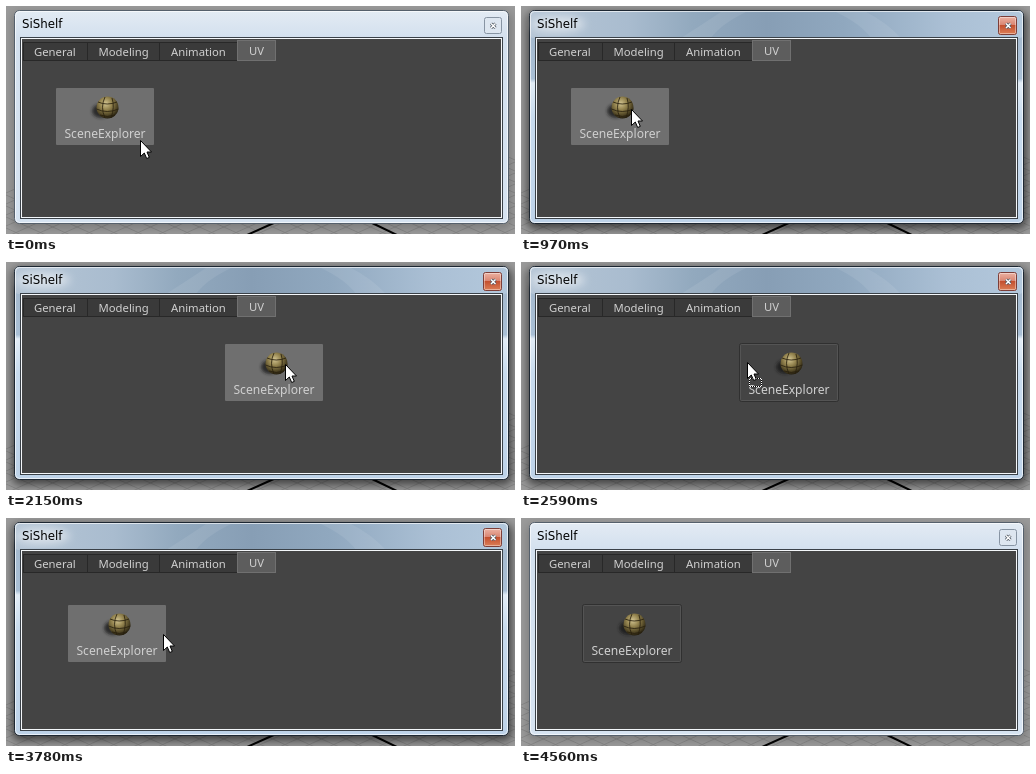
Write an HTML page that moves like this. It is 509 by 228 pixels and loops after 4.66 s.

```html
<!DOCTYPE html>
<html lang="en">
<head>
<meta charset="utf-8">
<title>Shelf drag and drop</title>
<style>
  html, body { margin: 0; width: 100%; height: 100%; overflow: hidden; background: #999; }
  svg { display: block; width: 509px; height: 228px; }
  text { font-family: "Noto Sans", sans-serif; fill: #d0d0d0; }
  .title { font: 11.8px "DejaVu Sans", sans-serif; fill: #000; }
  .tab { font-size: 11.3px; }
  .label { font-size: 12.1px; text-anchor: middle; }
</style>
</head>
<body>
<svg viewBox="0 0 509 228" xmlns="http://www.w3.org/2000/svg">
  <defs>
    <linearGradient id="pale" x2="0" y2="1">
      <stop offset="0" stop-color="#e3ebf4"/><stop offset=".13" stop-color="#d3e0ee"/>
      <stop offset="1" stop-color="#d6e3f1"/>
    </linearGradient>
    <linearGradient id="sides" x2="0" y2="1">
      <stop offset="0" stop-color="#a3b7cb"/><stop offset=".32" stop-color="#a9bfd5"/>
      <stop offset=".34" stop-color="#e2ecf6"/><stop offset=".5" stop-color="#c8dbee"/>
      <stop offset="1" stop-color="#bdd2e8"/>
    </linearGradient>
    <linearGradient id="glass" x2="1" y2="0">
      <stop offset="0" stop-color="#b6c6d6"/><stop offset=".2" stop-color="#a9bccf"/>
      <stop offset=".33" stop-color="#92a9be"/><stop offset=".48" stop-color="#879eb5"/>
      <stop offset=".64" stop-color="#90a8bf"/><stop offset=".85" stop-color="#abc0d5"/>
      <stop offset="1" stop-color="#b3c8dc"/>
    </linearGradient>
    <linearGradient id="red" x2="0" y2="1">
      <stop offset="0" stop-color="#ecb3a4"/><stop offset=".48" stop-color="#d98470"/>
      <stop offset=".5" stop-color="#c4502f"/><stop offset="1" stop-color="#dc8058"/>
    </linearGradient>
    <radialGradient id="ball" cx=".42" cy=".32" r=".68">
      <stop offset="0" stop-color="#d2c491"/><stop offset=".4" stop-color="#94844f"/>
      <stop offset=".75" stop-color="#554a28"/><stop offset="1" stop-color="#251f10"/>
    </radialGradient>
    <filter id="blur" x="-20%" y="-20%" width="140%" height="140%"><feGaussianBlur stdDeviation="4"/></filter>
    <filter id="soft" x="-50%" y="-50%" width="200%" height="200%"><feGaussianBlur stdDeviation="1.5"/></filter>
    <clipPath id="floor"><path d="M0 179L9 183V218H503V149L509 152V228H0Z"/></clipPath>
  </defs>

  <rect width="509" height="228" fill="#9a9a9a"/>
  <g id="grid" clip-path="url(#floor)" stroke="#858585" fill="none"></g>
  <path d="M241 229L270 216M364 216L391 229" stroke="#000" stroke-width="2"/>
  <rect id="shadow" x="6" y="6" width="500" height="217" rx="8" filter="url(#blur)"/>

  <g id="inactive">
    <rect x="8.5" y="4.5" width="494" height="213" rx="5" fill="url(#pale)" stroke="#55606c"/>
    <rect x="478.5" y="11.5" width="17" height="16" rx="2" fill="#dde6f0" stroke="#8794a3"/>
  </g>
  <g id="active">
    <rect x="8.5" y="4.5" width="494" height="213" rx="5" fill="url(#sides)" stroke="#1d2732"/>
    <rect x="9" y="5" width="493" height="27" rx="4" fill="url(#glass)"/>
    <path d="M160 32Q185 16 200 6H225Q200 18 190 32ZM315 6Q340 18 350 32H380Q365 16 345 6Z" fill="#fff" opacity=".08"/>
    <ellipse cx="37" cy="18" rx="27" ry="8" fill="#fff" opacity=".5" filter="url(#blur)"/>
    <rect x="477.5" y="10.5" width="18" height="18" rx="2" fill="url(#red)" stroke="#7c3e38"/>
    <rect x="478.5" y="11.5" width="16" height="16" rx="1" fill="none" stroke="#fff" stroke-opacity=".4"/>
  </g>
  <rect x="9.5" y="5.5" width="492" height="211" rx="4" fill="none" stroke="#fff" stroke-opacity=".65"/>
  <g fill="none">
    <path d="M485 17.5L489.5 22M489.5 17.5L485 22" stroke="#4b5561" stroke-width="3"/>
    <path d="M485 17.5L489.5 22M489.5 17.5L485 22" stroke="#fff" stroke-width="1.5"/>
  </g>
  <text class="title" x="16" y="22">SiShelf</text>

  <rect x="14.5" y="31.5" width="482" height="181" fill="#444" stroke="#3a4148"/>
  <rect x="15.5" y="32.5" width="480" height="179" fill="none" stroke="#f4f7fa"/>
  <g id="tabs"></g>

  <g id="button">
    <rect id="hover" x="1" y="1" width="98" height="57" rx="1" fill="#6f6f6f"/>
    <g id="edge" fill="none">
      <rect x=".5" y=".5" width="99" height="58" rx="2" stroke="#303030"/>
      <rect x="1.5" y="1.5" width="97" height="56" rx="1" stroke="#545454"/>
    </g>
    <ellipse cx="46" cy="24" rx="9" ry="7" fill="#181818" opacity=".75" filter="url(#soft)"/>
    <circle cx="52.5" cy="20.5" r="11" fill="url(#ball)"/>
    <path d="M50 10Q45 20 50 31M57 11Q60 20 56 31M43 15Q52 19 62 15M41.5 22Q52 27 63.5 22M45 28Q52 31 60 28"
      fill="none" stroke="#2a220f" opacity=".85"/>
    <text class="label" x="50" y="51">SceneExplorer</text>
  </g>

  <g id="cursor">
    <g id="drag" fill="none">
      <rect x="2.5" y="16.5" width="12" height="8" stroke="#fff"/>
      <rect x="2.5" y="16.5" width="12" height="8" stroke="#000" stroke-dasharray="1 1" stroke-dashoffset=".5"/>
    </g>
    <path d="M.5 .5V16.5L4.3 13L6.700 18.5L9.3 17.4L7 12H11.5Z" fill="#fff" stroke="#000"/>
  </g>
</svg>
<script>
const LOOP = 4660;
const el = id => document.getElementById(id);

// Cursor runs: first step, last step, step count, end x, end y
const START = [134, 134];
const RUNS = [
  [60, 530, 8, 123, 118],
  [590, 780, 4, 110, 103],
  [1030, 1440, 8, 258, 102],
  [1500, 1810, 6, 279, 103],
  [2150, 2150, 1, 279, 102],
  [2220, 2290, 2, 277, 98],
  [2360, 2650, 5, 213, 101],
  [2710, 3060, 7, 119, 103],
  [3780, 3780, 1, 157, 116],
  [3840, 3970, 3, 338, 214]
];
// Button places: from time, x, y
const PLACES = [[0, 49, 81], [1870, 218, 81], [3250, 61, 86]];
const HOVER = [[0, 1030], [1870, 2360], [3250, 3840]];
const DRAG = [[1030, 1870], [2360, 3250]];
const ACTIVE = [[970, 4560]];
const POINTER = [[0, 4030]];

// Tabs: name, x, width, text x
const TABS = [["General", 17, 64, 28], ["Modeling", 81, 72, 92.5], ["Animation", 153, 78, 165], ["UV", 231, 38, 243]];
el("tabs").innerHTML = TABS.map(([name, x, w, tx], i) => {
  const on = i === 3, y = on ? 34 : 36;
  return `<rect x="${x}" y="${y}" width="${w + 1}" height="${55 - y}" fill="${on ? "#707070" : "#282828"}"/>
    <rect x="${x + 1}" y="${y + 1}" width="${w - 1}" height="${53 - y}" fill="${on ? "#5d5d5d" : "#3a3a3a"}"/>
    <text class="tab" x="${tx}" y="${on ? 49 : 50}">${name}</text>`;
}).join("");

let lines = "";
for (let c = -240; c < 470; c += 11) lines += `M0 ${c}l509 229M0 ${c + 229}l509 -229`;
el("grid").innerHTML = `<path d="${lines}" stroke-width=".8"/>`;

const within = (spans, t) => spans.some(([a, b]) => t >= a && t < b);
const show = (id, on) => el(id).setAttribute("display", on ? "inline" : "none");
const place = (id, x, y) => el(id).setAttribute("transform", `translate(${x} ${y})`);

function cursorAt(t) {
  let [x, y] = START;
  for (const [a, b, n, ex, ey] of RUNS) {
    if (t < a) break;
    const step = (b - a) / (n - 1) || 1;
    const p = Math.min(n, 1 + Math.floor((t - a) / step + .3)) / n;
    x += (ex - x) * p;
    y += (ey - y) * p;
  }
  return [Math.round(x), Math.round(y)];
}

function draw(t) {
  const active = within(ACTIVE, t), hover = within(HOVER, t);
  const [, bx, by] = PLACES.filter(p => t >= p[0]).pop();
  show("active", active);
  show("inactive", !active);
  el("shadow").setAttribute("opacity", active ? .55 : .18);
  show("hover", hover);
  show("edge", !hover);
  place("button", bx, by);
  show("cursor", within(POINTER, t));
  show("drag", within(DRAG, t));
  place("cursor", ...cursorAt(t));
}

const begin = performance.now();
function tick() {
  draw((performance.now() - begin) % LOOP);
  requestAnimationFrame(tick);
}
tick();
</script>
</body>
</html>
```
